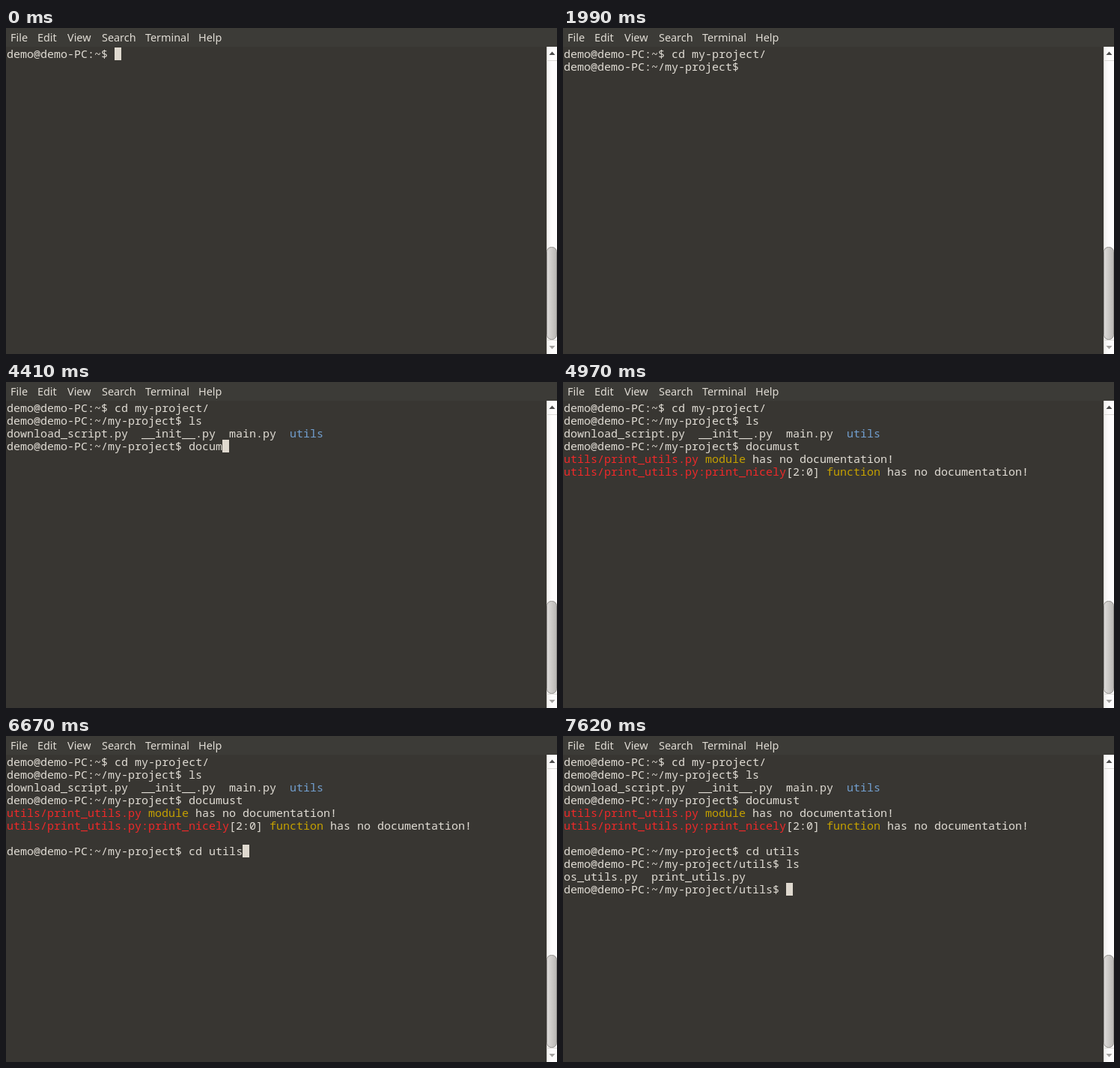
Write an HTML page that moves like this. It is 736 by 435 pixels and loops after 8 s.

```html
<!DOCTYPE html>
<html lang="en">
<head>
<meta charset="utf-8">
<title>Terminal session</title>
<style>
  html, body { margin: 0; width: 100%; height: 100%; overflow: hidden; background: #383632; }
  #stage { position: relative; width: 736px; height: 435px; overflow: hidden; color: #e0dcd4; }
  #menu { position: absolute; inset: 0 0 auto; height: 25px; background: #3c3b37; }
  #menu span { position: absolute; top: 0; font: 14.4px/25px "Noto Sans", "Open Sans", sans-serif; white-space: pre; }
  #screen { position: absolute; left: 1px; top: 26px; margin: 0; font: 15px/17px "Noto Sans Mono", monospace; font-variant-ligatures: none; }
  #cursor { display: inline-block; width: 9px; height: 17px; vertical-align: top; background: #dfd9cf; }
  [hidden] { display: none !important; }
  .red { color: #ef2929; }
  .yellow { color: #c4a000; }
  .blue { color: #729fcf; }
  #bar { position: absolute; left: 722px; top: 25px; }
</style>
</head>
<body>
<div id="stage">
  <div id="menu">
    <span style="left:6px">File</span>
    <span style="left:42px">Edit</span>
    <span style="left:82px">View</span>
    <span style="left:128px">Search</span>
    <span style="left:186px">Terminal</span>
    <span style="left:257px">Help</span>
  </div>
  <pre id="screen"></pre>
  <svg id="bar" width="14" height="410">
    <defs>
      <linearGradient id="track"><stop stop-color="#f1f0ee"/><stop offset=".5" stop-color="#fdfcfc"/></linearGradient>
      <linearGradient id="thumb"><stop stop-color="#dedcda"/><stop offset="1" stop-color="#b9b7b4"/></linearGradient>
    </defs>
    <rect width="14" height="410" fill="url(#track)"/>
    <path d="M.5 0V410" stroke="#d2d0cd"/>
    <path d="M0 18.5H14M0 391.5H14" stroke="#dcdad7"/>
    <path d="M3.5 11L7.5 6.5L11.5 11Z" fill="#4c4c4c"/>
    <path d="M3.5 399L7.5 403.5L11.5 399Z" fill="#a5a3a1"/>
    <rect x=".5" y="267.5" width="13" height="123" rx="6" fill="url(#thumb)" stroke="#92908d"/>
  </svg>
</div>
<script>
const LOOP = 8000;
const home = "demo@demo-PC:~";
const project = home + "/my-project";

// Output chunks: [time, text, colour]
const chunks = [
  [0, home + "$ "],
  [360, "c"], [570, "d"], [730, " "], [890, "m"], [1050, "y"], [1190, "-"],
  [1410, "p"], [1510, "r"], [1600, "o"], [1700, "ject/"],
  [1990, "\n" + project + "$ "],
  [2950, "l"], [3050, "s"],
  [3290, "\ndownload_script.py  __init__.py  main.py  "],
  [3290, "utils", "blue"],
  [3290, "\n" + project + "$ "],
  [3950, "d"], [4040, "o"], [4140, "c"], [4230, "u"], [4410, "m"],
  [4580, "u"], [4660, "s"], [4750, "t"], [4890, "\n"],
  [4970, "utils/print_utils.py", "red"],
  [4970, " module", "yellow"],
  [4970, " has no documentation!\n"],
  [4970, "utils/print_utils.py:print_nicely", "red"],
  [4970, "[2:0] "],
  [4970, "function", "yellow"],
  [4970, " has no documentation!\n"],
  [5070, "\n" + project + "$ "],
  [5790, "c"], [5940, "d"], [6070, " "],
  [6200, "u"], [6300, "t"], [6400, "i"], [6580, "l"], [6670, "s"],
  [6820, "\n" + project + "/utils$ "],
  [7190, "l"], [7300, "s"], [7520, "\n"],
  [7620, "os_utils.py  print_utils.py\n" + project + "/utils$ "]
];
const cursorOn = [[0, 1700], [3950, 4890], [6580, LOOP]];

const screen = document.getElementById("screen");
const spans = chunks.map(([, text, colour]) => {
  const span = document.createElement("span");
  span.textContent = text;
  if (colour) span.className = colour;
  screen.append(span);
  return span;
});
const cursor = document.createElement("span");
cursor.id = "cursor";
screen.append(cursor);

const start = performance.now();
function draw() {
  const t = (performance.now() - start) % LOOP;
  spans.forEach((span, i) => { span.hidden = t < chunks[i][0]; });
  cursor.hidden = !cursorOn.some(([from, to]) => t >= from && t < to);
  requestAnimationFrame(draw);
}
draw();
</script>
</body>
</html>
```
